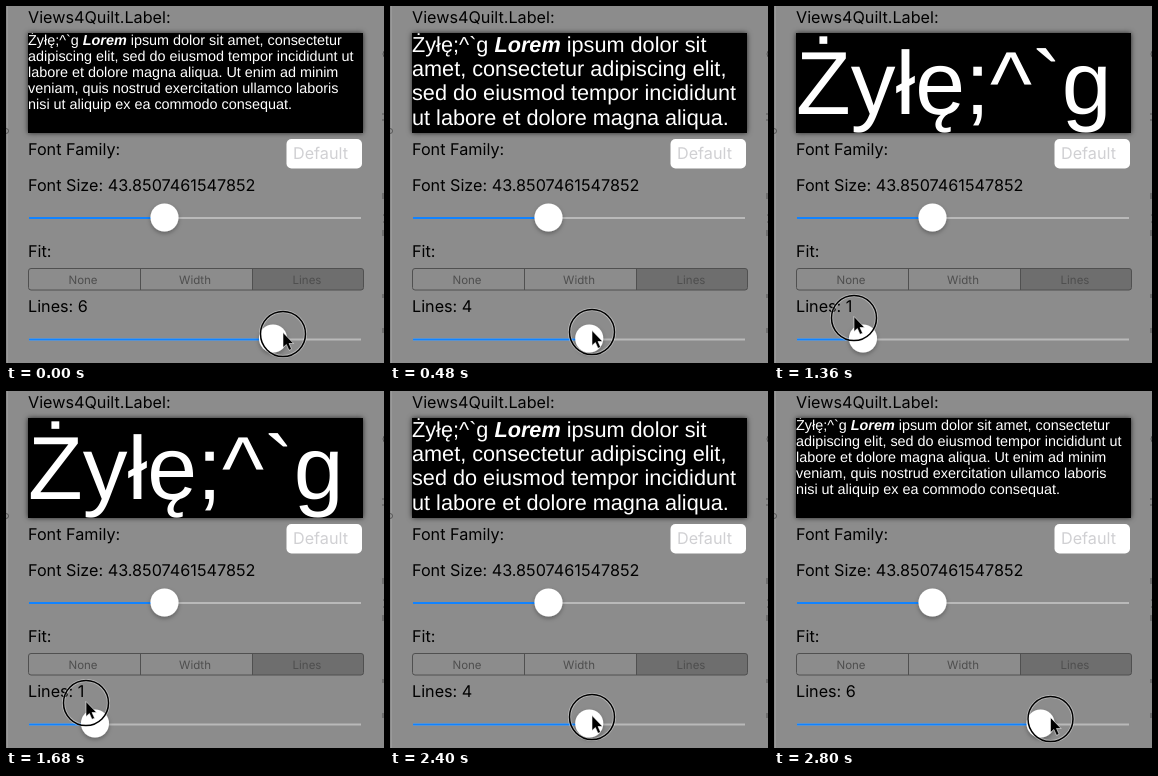
Write an HTML page that moves like this. It is 378 by 357 pixels and loops after 2.88 s.

```html
<!DOCTYPE html>
<html lang="en">
<head>
<meta charset="utf-8">
<title>Label fit demo</title>
<style>
  html, body { margin: 0; width: 100%; height: 100%; overflow: hidden; background: #8c8c8c; }
  #stage { position: relative; width: 378px; height: 357px; overflow: hidden; }
  svg { position: absolute; left: 0; top: 0; }
  text { font-family: Inter, Roboto, sans-serif; text-rendering: geometricPrecision; }
  .ui { font-size: 16.2px; fill: #000; }
  .seg { font-size: 11.5px; fill: #4e4e4e; text-anchor: middle; }
  #box {
    position: absolute; left: 22px; top: 27px; width: 335px; height: 100px;
    background: #000; box-shadow: 0 0 5px rgba(0, 0, 0, .75);
  }
  #clip { overflow: hidden; max-height: 100px; }
  #copy {
    color: #fff; line-height: 1.117;
    font-family: "Liberation Sans", Arial, sans-serif;
    text-rendering: geometricPrecision;
  }
</style>
</head>
<body>
<div id="stage">
  <div id="box"><div id="clip"><div id="copy">Żyłę;^`g <b><i>Lorem</i></b> ipsum dolor sit amet, consectetur adipiscing elit, sed do eiusmod tempor incididunt ut labore et dolore magna aliqua. Ut enim ad minim veniam, quis nostrud exercitation ullamco laboris nisi ut aliquip ex ea commodo consequat.</div></div></div>

  <svg width="378" height="357" viewBox="0 0 378 357">
    <defs>
      <filter id="soft" x="-50%" y="-50%" width="200%" height="200%">
        <feDropShadow dx="0" dy="2" stdDeviation="2" flood-color="#000" flood-opacity=".3"/>
      </filter>
      <g id="knob"><circle r="14" fill="#fff" filter="url(#soft)"/></g>
    </defs>

    <!-- slivers of the page at both sides -->
    <path d="M1.5 0V357" stroke="#9a9a9a"/>
    <g fill="none" stroke="#555">
      <circle cx="0" cy="125" r="2.5"/>
      <path d="M378 45q-2 3 0 6M377 107v2M377 113v2M377 187v6M377 209h1M377 216h1M377 224v6M377 288v4M377 322v5"/>
    </g>

    <g class="ui">
      <text class="ui" x="22" y="16.5">Views4Quilt.Label:</text>
      <text class="ui" x="22" y="149">Font Family:</text>
      <text class="ui" x="22" y="185">Font Size: 43.8507461547852</text>
      <text class="ui" x="22" y="251">Fit:</text>
      <text class="ui" x="22" y="306" id="count">Lines: 6</text>
    </g>

    <rect x="280.5" y="133" width="75.5" height="29.5" rx="5" fill="#fff"/>
    <text class="ui" x="287" y="153" style="fill:#d0d0d3">Default</text>

    <path d="M23 212H355" stroke="#b9b9b9" stroke-width="2"/>
    <path d="M23 212H158" stroke="#1183ff" stroke-width="2"/>
    <use href="#knob" x="158.5" y="211.5"/>

    <path d="M246 262.5H355.5a2 2 0 0 1 2 2V282a2 2 0 0 1-2 2H246z" fill="#6e6e6e"/>
    <rect x="22.5" y="262.5" width="335" height="21.5" rx="2.5" fill="none" stroke="#505050"/>
    <path d="M134.5 262.5V284M246.5 262.5V284" stroke="#505050"/>
    <text class="seg" x="77" y="277.5">None</text>
    <text class="seg" x="189" y="277.5">Width</text>
    <text class="seg" x="301" y="277.5">Lines</text>

    <path d="M23 333.5H355" stroke="#b9b9b9" stroke-width="2"/>
    <path id="fill" stroke="#1183ff" stroke-width="2"/>
    <use href="#knob" id="thumb" y="332.5"/>

    <g id="pointer">
      <circle r="22.5" fill="none" stroke="#fff" stroke-opacity=".4" stroke-width="3.2"/>
      <circle r="22.5" fill="none" stroke="#000" stroke-width="1.5"/>
      <path d="M0-1.5V13.5L3.4 10.5 6 16.3 8.6 15.2 6 9.5H10.6z" fill="#000"
            stroke="#fff" stroke-opacity=".7" stroke-width=".8"/>
    </g>
  </svg>
</div>

<script>
  const STEP = 80, STEPS = 36, LAST = 14;

  // step, pointer x, pointer y
  const path = [
    [0, 277, 328], [1, 276.5, 328], [2, 268, 328], [6, 202, 326],
    [11, 120, 317], [13, 86, 312.5], [14, 80, 312]
  ];
  const $ = id => document.getElementById(id);

  function pointerAt(step) {
    const i = Math.max(1, path.findIndex(p => p[0] >= step));
    const a = path[i - 1], b = path[i];
    const k = (step - a[0]) / (b[0] - a[0]);
    return [1, 2].map(j => a[j] + (b[j] - a[j]) * k);
  }

  function setLines(n) {
    const size = 100 / (1.165 * n - 0.048);
    $("count").textContent = "Lines: " + n;
    $("copy").style.fontSize = size + "px";
    $("clip").style.maxHeight = Math.min(100, Math.ceil(size * 1.117 * n)) + "px";
  }

  let shown = -1;

  function draw(now) {
    const tick = Math.floor(now / STEP) % STEPS;
    // drag left, rest, then retrace the way back
    const step = Math.min(tick, STEPS - tick, LAST);
    if (step !== shown) {
      shown = step;
      const [x, y] = pointerAt(step);
      const knob = 267 + (x - 277) * 178 / 197;
      $("pointer").setAttribute("transform", `translate(${x} ${y})`);
      $("thumb").setAttribute("x", knob);
      $("fill").setAttribute("d", `M23 333.5H${knob}`);
      setLines(Math.round((knob - 38) / 37.75));
    }
  }

  const start = performance.now();
  function loop() {
    draw(performance.now() - start);
    requestAnimationFrame(loop);
  }
  loop();
</script>
</body>
</html>
```
